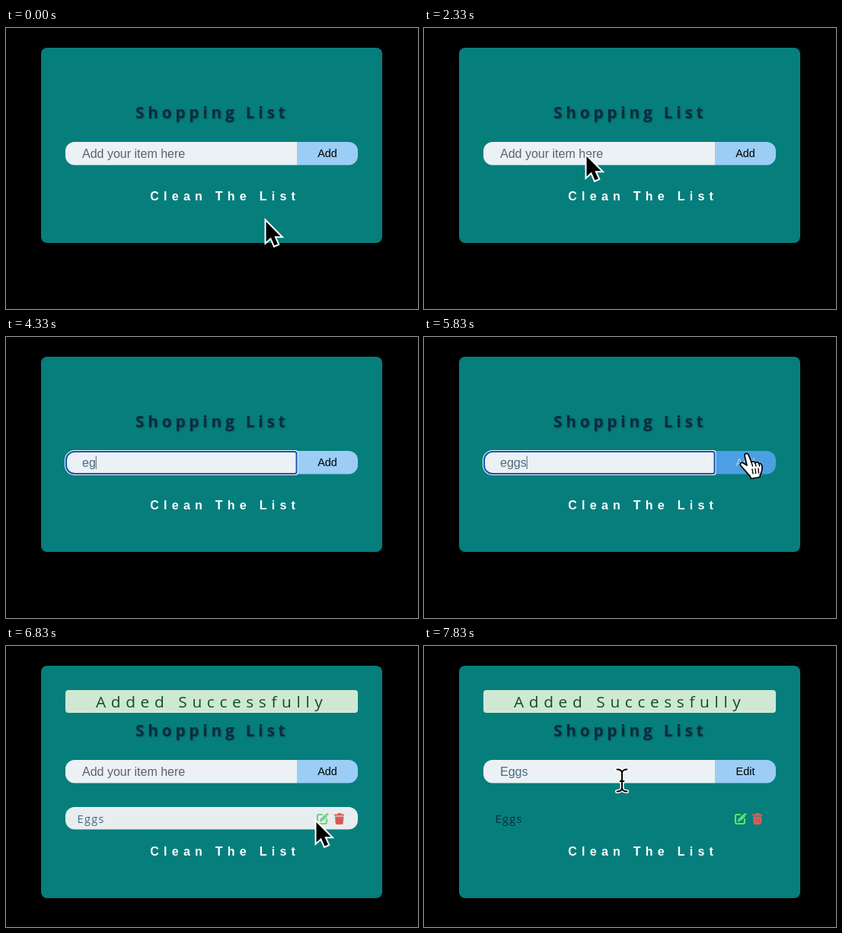
Animation of 541 by 370 pixels, one loop 8000 ms. Source, as an HTML page:

```html
<!DOCTYPE html>
<html lang="en">
<head>
<meta charset="utf-8">
<title>Shopping List</title>
<style>
  html, body { margin: 0; width: 100%; height: 100%; overflow: hidden; background: #000; }
  svg { display: block; width: 100%; height: 100%; }
  text { font-family: "Open Sans", "Noto Sans", sans-serif; white-space: pre; }
  .ui { font-family: "Liberation Sans", Arial, sans-serif; }
  .title { font-size: 20.8px; font-weight: 700; letter-spacing: 4.8px; fill: #0c2a3d; filter: drop-shadow(1px 1px 1px #0004); }
  .alert { font-size: 20.8px; letter-spacing: 6.65px; fill: #114c25; }
  .clear { font-size: 16px; font-weight: 700; letter-spacing: 6.25px; fill: #fff; }
  .item { font-size: 14.4px; letter-spacing: 1.45px; }
  .line { fill: none; stroke-linecap: round; stroke-linejoin: round; }
</style>
</head>
<body>
<svg viewBox="0 0 541 370" preserveAspectRatio="none">
  <rect id="card" x="46" y="26" width="448" rx="8" fill="#067e7c"/>
  <g id="alert">
    <rect x="78" y="58" width="384" height="30" rx="4" fill="#cee8d3"/>
    <text class="alert" x="118" y="81">Added Successfully</text>
  </g>
  <text class="title" x="170" y="119">Shopping List</text>

  <path d="M382 150H90a12 12 0 0 0-12 12v6.500a12 12 0 0 0 12 12H382z" fill="#ebf1f4"/>
  <path id="button" d="M382 150h68a12 12 0 0 1 12 12v6.500a12 12 0 0 1-12 12h-68z"/>
  <g id="ring" class="line">
    <path d="M380 150H90a12 12 0 0 0-12 12v7a12 12 0 0 0 12 12H380q2.500 0 2.500-2.500V152.500q0-2.500-2.500-2.500z" stroke="#f4f8fa" stroke-width="2"/>
    <path d="M379 151H90a11 11 0 0 0-11 11v7a11 11 0 0 0 11 11H379q2.500 0 2.500-2.500V153.500q0-2.500-2.500-2.500z" stroke="#1453b4" stroke-width="2"/>
  </g>
  <text id="field" class="ui" x="100" y="171" font-size="16"></text>
  <rect id="caret" y="156.500" width="1" height="17.500" fill="#4b6b82"/>
  <text id="label" class="ui" x="422" y="170" font-size="14.4" text-anchor="middle"></text>

  <g id="row">
    <rect id="rowFill" x="78" y="212" width="384" height="29.500" rx="12" fill="#e8edf0"/>
    <text id="item" class="item" x="93.500" y="233">Eggs</text>
    <g id="edit" class="line" stroke="#5fe068" stroke-width="2.200">
      <path d="M415 222h-4q-2 0-2 2v8q0 2 2 2h8q2 0 2-2v-4"/>
      <path d="M415 228.500l5.500-5.500" stroke-width="4" stroke-linecap="butt"/>
      <path d="M413.500 230l1-2M421.500 222l.5-.5" stroke-width="3"/>
    </g>
    <path d="M431 221.500h4l1-1.500h4l1 1.500h3v2h-13zM432 224.500h11.500l-.8 9q-.1 1.500-1.500 1.500h-7q-1.400 0-1.500-1.500z" fill="#d9605f"/>
    <path class="line" d="M435.300 227v5.500M437.800 227v5.500M440.300 227v5.500" stroke="#b9504f" stroke-width=".7"/>
  </g>
  <text id="clear" class="ui clear" x="189.300">Clean The List</text>

  <g id="arrow">
    <path d="M1.500 4V30.500l6.300-5.700 4.700 10.700 4.500-2-4.700-10.200h8.200z" fill="#000" stroke="#fff" stroke-width="4" paint-order="stroke"/>
  </g>
  <g id="hand" class="line" stroke="#000" stroke-width="1.700">
    <path d="M-3 2C-3-1 1-1.500 2 1L6 11c2-2 4-1 5 1 2-2 4-1 5 1 2-1 4 1 4 4 0 5-1 8-2.500 10l-.5 3.500-11.500 2-1.500-3.500C1 26-3 21-8 15.500c-2-3 1-5.500 4-3L0 15z" fill="#fff"/>
    <path d="M6 11l1.500 5M11 12l1 4M16 13l.7 3M7 20l1 6M11 19.500l.7 6M15 19l.5 6" stroke-width="1.400"/>
  </g>
  <g id="beam" class="line">
    <path id="beamShape" d="M-6.500-14.500Q-1-14.500 0-10.500Q1-14.500 6.500-14.500M-6.500 14.500Q-1 14.500 0 10.500Q1 14.500 6.500 14.500M0-10.500V10.500M-2.500 1H2.500" stroke="#fff" stroke-width="5"/>
    <use href="#beamShape" id="beamInk"/>
    <path d="M-6.500-14.500Q-1-14.500 0-10.500Q1-14.500 6.500-14.500M-6.500 14.500Q-1 14.500 0 10.500Q1 14.500 6.500 14.500M0-10.500V10.500M-2.500 1H2.500" stroke="#000" stroke-width="2"/>
  </g>
</svg>
<script>
const LOOP = 8000;
const $ = id => document.getElementById(id);
const set = (id, attrs) => Object.entries(attrs).forEach(([k, v]) => $(id).setAttribute(k, v));
const show = (id, on) => set(id, { visibility: on ? 'visible' : 'hidden' });
const at = (steps, t) => steps.filter(s => s[0] <= t).pop();

$('beamInk').remove();

// Each step: start time in ms, followed by the values held until the next step.
const pointer = [
  [0, 'arrow', 340, 251], [165, 'arrow', 334, 242], [330, 'arrow', 322, 230],
  [2330, 'arrow', 212, 165], [2500, 'beam', 207, 168], [2665, 'beam', 206, 168],
  [3830, 'none', 0, 0],
  [5165, 'beam', 220, 170], [5330, 'beam', 290, 168], [5500, 'hand', 390, 158],
  [5665, 'hand', 420, 155], [5830, 'hand', 424, 154], [6165, 'hand', 424, 155],
  [6500, 'arrow', 405, 182], [6665, 'arrow', 406, 208], [6830, 'arrow', 406, 228],
  [7000, 'hand', 414, 226], [7500, 'hand', 413, 224],
  [7665, 'arrow', 330, 192], [7830, 'beam', 260, 177]
];
const typing = [[2500, ''], [3830, 'e'], [4330, 'eg'], [4500, 'egg'], [4665, 'eggs']];
const button = [
  [0, '#9bcdf5', '#000'], [5665, '#70b5ec', '#55758c'], [5830, '#4c9fe2', '#b5cde0'],
  [6000, '#449ae0', '#fff'], [6665, '#70b5ec', '#40607a'], [6830, '#9bcdf5', '#000']
];
const rowHover = [[0, 0], [6665, .5], [6830, 1], [7665, .5], [7830, 0]];

function draw(t) {
  const added = t >= 6165;
  const focused = t >= 2500 && !added;
  const editing = t >= 7500;

  set('card', { height: added ? 306 : 257 });
  set('clear', { y: added ? 276 : 227 });
  show('alert', added);
  show('row', added);

  const [keyTime, typed] = focused ? at(typing, t) : [0, editing ? 'Eggs' : ''];
  $('field').textContent = typed || 'Add your item here';
  set('field', { fill: typed ? '#4b6b82' : '#5c6267' });
  show('ring', focused);
  show('caret', focused && (t - keyTime) % 1000 < 500);
  set('caret', { x: 100 + (typed ? $('field').getComputedTextLength() : 0) });

  const [, fill, ink] = at(button, t);
  set('button', { fill });
  set('label', { fill: ink });
  $('label').textContent = editing ? 'Edit' : 'Add';

  const hover = at(rowHover, t)[1];
  set('rowFill', { opacity: hover });
  set('item', { fill: hover ? '#456880' : '#0c2a3d' });
  set('edit', { stroke: hover === 1 ? '#6fd47f' : '#5fe068' });

  const [, kind, x, y] = at(pointer, t);
  for (const id of ['arrow', 'hand', 'beam']) {
    show(id, id === kind);
    set(id, { transform: `translate(${x} ${y})` });
  }
}

const start = performance.now();
function tick() {
  draw((performance.now() - start) % LOOP);
  requestAnimationFrame(tick);
}
tick();
</script>
</body>
</html>
```
